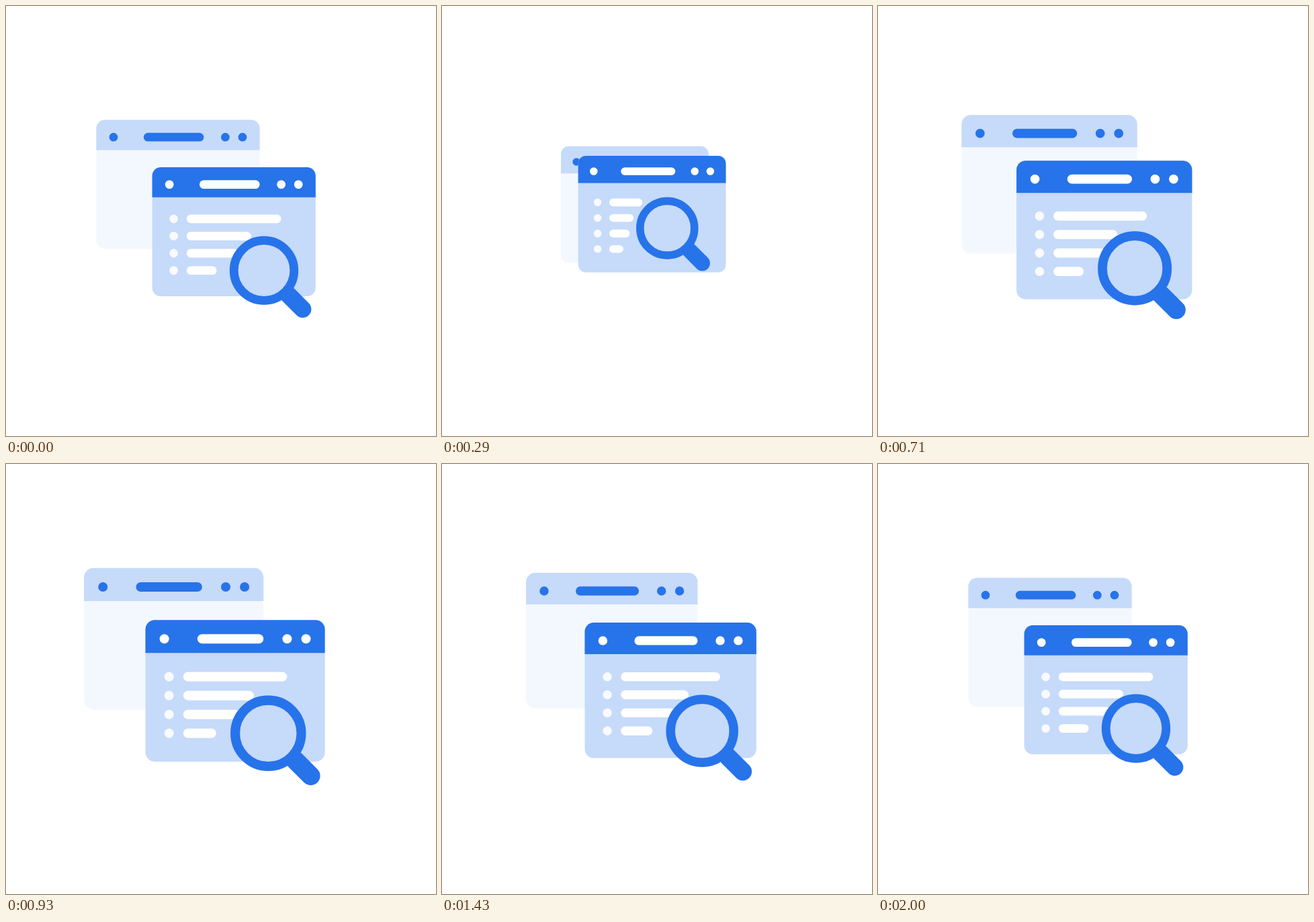
An HTML page that plays this animation: 640 by 640 pixels, repeating every 2.43 s.

```html
<!DOCTYPE html>
<html lang="en">
<head>
<meta charset="utf-8">
<title>Search windows</title>
<style>
html, body { margin: 0; width: 100%; height: 100%; overflow: hidden; background: #fff; }
svg { display: block; width: 100vw; height: 100vh; }
.line { fill: none; stroke-width: 2; stroke-linecap: round; }
</style>
</head>
<body>
<svg viewBox="0 0 640 640">
  <defs>
    <rect id="body" width="38" height="30" rx="2"/>
    <path id="bar" d="M0 7V2a2 2 0 0 1 2-2h34a2 2 0 0 1 2 2v5z"/>
    <path id="controls" class="line" d="M4 4h0M12 4h12M30 4h0M34 4h0"/>
  </defs>
  <g id="scene">
    <g id="back">
      <use href="#body" fill="#f3f8fe"/>
      <use href="#bar" fill="#c6dafa"/>
      <use href="#controls" stroke="#2773ea"/>
    </g>
    <g id="front">
      <use href="#body" fill="#c6dafa"/>
      <use href="#bar" fill="#2773ea"/>
      <use href="#controls" stroke="#fff"/>
      <path class="line" stroke="#f8fafc" d="M5 12h0M5 16h0M5 20h0M5 24h0"/>
      <path id="rows" class="line" stroke="#fff"/>
    </g>
    <g id="glass" stroke="#2773ea">
      <path d="M5.75 5.75L9 9" stroke-width="4" stroke-linecap="round"/>
      <circle r="7" fill="#c6dafa" stroke-width="2"/>
    </g>
  </g>
</svg>
<script>
const LOOP = 2430, FPS = 14, LAST = 28;
const UNIT = 6.4; // pixels per drawing unit at rest
const ROWS = [20, 13, 10, 5];
const $ = id => document.getElementById(id);
const place = (id, x, y) => $(id).setAttribute('transform', `translate(${x} ${y})`);
const mix = (a, b, k) => a + (b - a) * k;

// Bezier easing whose ends are flat: handles at (a, 0) and (b, 1)
function ease(x, a, b) {
  let lo = 0, hi = 1, s;
  for (let i = 0; i < 30; i++) {
    s = (lo + hi) / 2;
    const at = 3 * (1 - s) * s * ((1 - s) * a + s * b) + s ** 3;
    if (at < x) lo = s; else hi = s;
  }
  return s * s * (3 - 2 * s);
}

// Size of the scene and how far it is gathered, at a given step
function pose(n) {
  if (n <= 5.5) {
    const k = n ? ease(n / 5.5, .33, .1) : 0;
    return [mix(1, .9, k), k];
  }
  if (n <= 12) {
    const k = ease((n - 5.5) / 6.5, .63, .37);
    return [mix(.9, 1.1, k), 1 - k];
  }
  return [mix(1.1, 1, ease((n - 12) / 16, .25, .75)), 0];
}

function draw(now) {
  const t = Math.floor(now % LOOP / 10) * 10 + 5;
  const [size, p] = pose(Math.min(LAST, Math.floor(t * FPS / 1000)));
  const shift = 4.45 * p;
  $('scene').setAttribute('transform', `translate(320 320) scale(${UNIT * size})`);
  place('back', -29 + shift, -23.5 + shift);
  place('front', -16 - shift, -12.5 - shift);
  place('glass', 10 - 7.65 * p, 11.5 - 10.04 * p);
  $('rows').setAttribute('d',
    ROWS.map((len, i) => `M9 ${12 + 4 * i}h${len * (1 - .7 * p)}`).join(''));
}

const start = performance.now();
function tick() {
  draw(performance.now() - start);
  requestAnimationFrame(tick);
}
tick();
</script>
</body>
</html>
```
